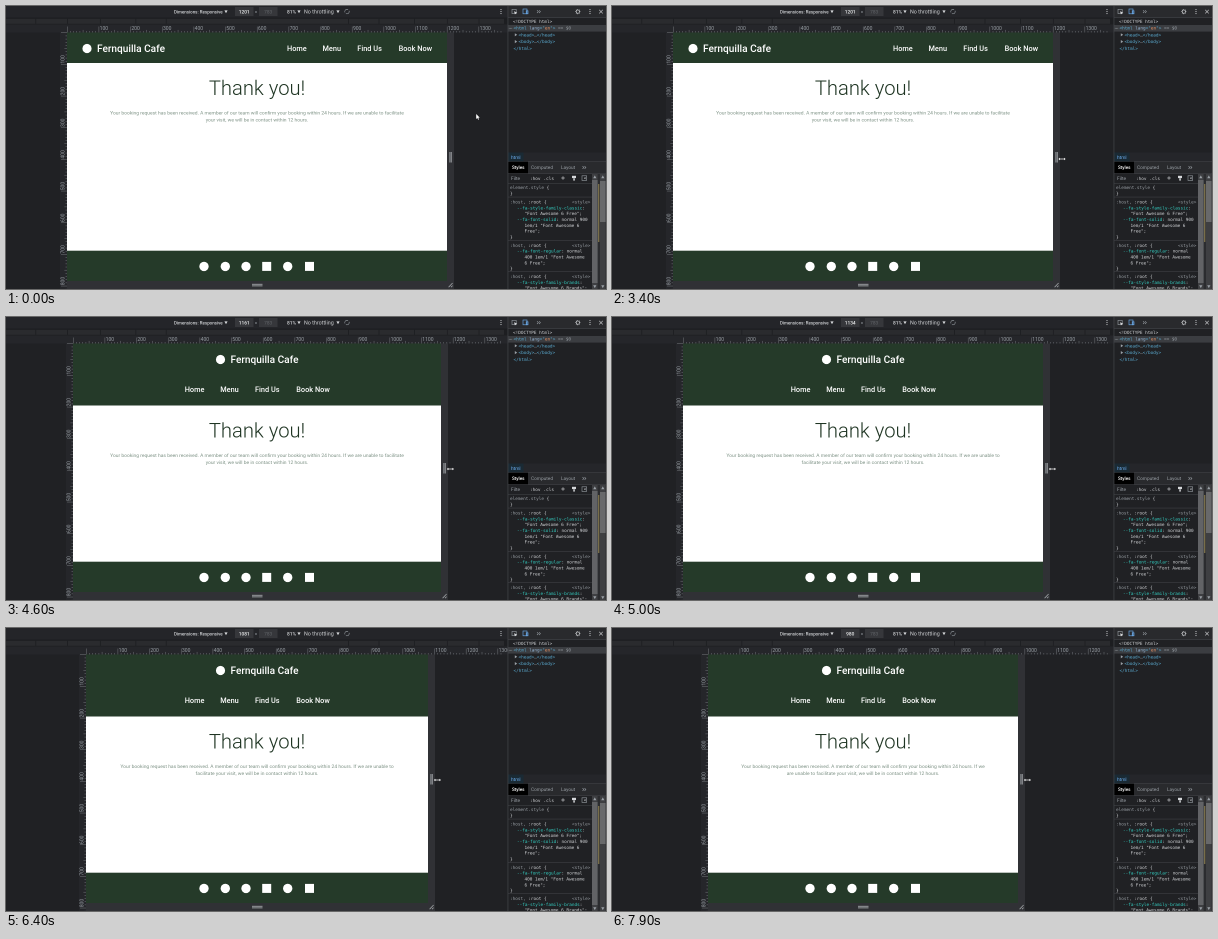
An HTML page with a canvas that plays this animation: 600x283 px, repeating every 8 s.

```html
<!DOCTYPE html>
<html lang="en">
<head>
<meta charset="utf-8">
<title>Responsive preview</title>
<style>
html, body { margin: 0; width: 100%; height: 100%; overflow: hidden; background: #202124; }
canvas { display: block; width: 600px; height: 283px; }
</style>
</head>
<body>
<canvas id="stage"></canvas>
<script>
const canvas = document.getElementById('stage');
const ctx = canvas.getContext('2d');
// Twice the screen density keeps the tiny text smooth.
const density = 2 * (window.devicePixelRatio || 1);
canvas.width = 600 * density;
canvas.height = 283 * density;

const LOOP = 8000, STEP = 100;
const MID = 251, TOP = 26.5, FOOT = 244.7, BOTTOM = 275, SCALE = 0.3166;
const SANS = 'Roboto, "Open Sans", sans-serif';
const MONO = '"DejaVu Sans Mono", "Liberation Mono", monospace';
const GREEN = '#253a29', INK = '#1f3523';
const BLUE = '#5db0d7', TEAL = '#35d4c7', PALE = '#d5d7da', GREY = '#9aa0a6';

// [ms, device width]
const widths = [[0, 1201], [3450, 1201], [3600, 1195], [4200, 1181.6], [4500, 1168],
  [5000, 1134.4], [5400, 1118], [5800, 1106.4], [6300, 1086], [7100, 1047.2],
  [7200, 1037], [7900, 980.4]];
const pointerX = [[0, 471], [900, 472], [1800, 466], [2700, 451], [3400, 450]];
const pointerY = [[0, 109], [900, 114], [1800, 131], [2700, 152], [3400, 153], [4200, 152]];

const message = ('Your booking request has been received. A member of our team will confirm ' +
  'your booking within 24 hours. If we are unable to facilitate your visit, ' +
  'we will be in contact within 12 hours.').split(' ');

function track(keys, t) {
  if (t <= keys[0][0]) return keys[0][1];
  for (let i = 1; i < keys.length; i++) {
    const [t0, v0] = keys[i - 1], [t1, v1] = keys[i];
    if (t <= t1) return v0 + (v1 - v0) * (t - t0) / (t1 - t0);
  }
  return keys[keys.length - 1][1];
}

function rect(x, y, w, h, color) {
  ctx.fillStyle = color;
  ctx.fillRect(x, y, w, h);
}

function disc(x, y, r, color) {
  ctx.fillStyle = color;
  ctx.beginPath();
  ctx.arc(x, y, r, 0, Math.PI * 2);
  ctx.fill();
}

function poly(points, color, close) {
  ctx.beginPath();
  points.forEach(([x, y], i) => i ? ctx.lineTo(x, y) : ctx.moveTo(x, y));
  if (close) {
    ctx.fillStyle = color;
    ctx.fill();
  } else {
    ctx.strokeStyle = color;
    ctx.stroke();
  }
}

function text(str, x, y, size, color, { weight = 400, align = 'left', font = SANS } = {}) {
  ctx.font = `${weight} ${size}px ${font}`;
  ctx.textAlign = align;
  ctx.fillStyle = color;
  ctx.fillText(str, x, y);
}

// Coloured runs of code: color, string, color, string ...
function code(x, y, ...runs) {
  for (let i = 0; i < runs.length; i += 2) {
    text(runs[i + 1], x, y, 4.35, runs[i], { font: MONO });
    x += ctx.measureText(runs[i + 1]).width;
  }
}

// Small triangle pointing down (dir 1) or up (dir -1).
function caret(x, y, color = PALE, dir = 1) {
  poly([[x - 1.6, y - 1.2 * dir], [x + 1.6, y - 1.2 * dir], [x, y + 1.6 * dir]], color, true);
}

function dots(x, y) {
  for (const d of [-2, 0, 2]) disc(x, y + d, 0.55, PALE);
}

function chevrons(x, y) {
  ctx.lineWidth = 0.6;
  for (const d of [0, 2]) poly([[x + d, y - 1.4], [x + d + 1.4, y], [x + d, y + 1.4]], GREY);
}

function deviceBar(width) {
  rect(0, 0, 502, 11.5, '#242529');
  text('Dimensions: Responsive', 168, 7.3, 4.45, PALE, { weight: 500 });
  caret(220, 5.6);
  rect(229, 1, 18.5, 9, '#36373b');
  text(Math.floor(width), 238.2, 7.4, 4.8, '#f1f3f4', { weight: 500, align: 'center' });
  text('×', 250, 7.4, 4.6, GREY, { align: 'center' });
  rect(253, 1, 18.5, 9, '#36373b');
  text('783', 262.2, 7.4, 4.8, '#64676b', { align: 'center' });
  text('81%', 281, 7.4, 4.9, PALE, { weight: 500 });
  caret(293, 5.6);
  text('No throttling', 298, 7.4, 5.35, PALE);
  caret(332, 5.6);
  ctx.lineWidth = 0.6;
  ctx.strokeStyle = GREY;
  for (const from of [-0.4, 2.75]) {
    ctx.beginPath();
    ctx.arc(341, 5.6, 2.2, from, from + 2.5);
    ctx.stroke();
  }
  dots(495, 5.6);

  rect(0, 11.5, 502, 7, '#1d1e21');
  rect(0, 12.8, 498, 5, '#2a2b2e');
  for (const bp of [576, 768, 992, 1200, 1400]) {
    for (const side of [-1, 1]) rect(MID + side * bp * SCALE / 2, 12.8, 0.8, 5, '#1d1e21');
  }
}

function rulers(left) {
  rect(0, 18.5, 502, 8, '#25262a');
  rect(left - 7, TOP, 7, 283 - TOP, '#25262a');
  const gap = 10 * SCALE;
  const size = n => n % 10 === 0 ? 6 : n % 5 === 0 ? 2.6 : 1.5;
  for (let n = 0; left + n * gap < 497; n++) {
    const x = left + n * gap;
    rect(x, TOP - size(n), 0.5, size(n), '#73767b');
    if (n && n % 10 === 0) text(n * 10, x + 1, 24, 5, GREY);
  }
  for (let n = 0; TOP + n * gap < 283; n++) {
    const y = TOP + n * gap;
    rect(left - size(n), y, size(n), 0.5, '#73767b');
    if (n && n % 10 === 0) {
      ctx.save();
      ctx.translate(left - 2.4, y - 0.5);
      ctx.rotate(-Math.PI / 2);
      text(n * 10, 0, 0, 5, GREY);
      ctx.restore();
    }
  }
}

function wrap(limit) {
  ctx.font = `400 4.95px ${SANS}`;
  const lines = [''];
  for (const word of message) {
    const last = lines[lines.length - 1];
    const next = last ? last + ' ' + word : word;
    if (ctx.measureText(next).width > limit) lines.push(word);
    else lines[lines.length - 1] = next;
  }
  return lines;
}

function page(left, right, width) {
  const wide = width >= 1200;
  const w = right - left;
  const headEnd = wide ? 57 : 88.5;
  rect(left, TOP, w, BOTTOM - TOP, '#ffffff');
  rect(left, TOP, w, headEnd - TOP, GREEN);

  const brandX = wide ? left + 20 : 214.5;
  disc(brandX, 42.5, 4.6, '#ffffff');
  text('Fernquilla Cafe', brandX + 10, 46, 10.1, '#ffffff', { weight: 500 });
  const navX = wide ? right - 160 : 178.7;
  const navY = wide ? 45.1 : 75.2;
  [['Home', 0], ['Menu', 35.5], ['Find Us', 70.3], ['Book Now', 111.6]]
    .forEach(([label, dx]) => text(label, navX + dx, navY, 7.35, '#ffffff', { weight: 500 }));

  text('Thank you!', MID, headEnd + 32, 20.2, INK, { weight: 300, align: 'center' });
  wrap(w * 0.8).forEach((line, i) =>
    text(line, MID, headEnd + 51.7 + i * 6.8, 4.95, '#7c9184', { align: 'center' }));

  rect(left, FOOT, w, BOTTOM - FOOT, GREEN);
  for (const x of [198, 219.3, 240, 281.7]) disc(x, 260.4, 4.7, '#ffffff');
  for (const x of [260.7, 303.5]) rect(x - 4.5, 255.9, 9, 9, '#ffffff');
}

function handles(left, right) {
  rect(right, TOP, 7, 283 - TOP, '#303135');
  rect(left, BOTTOM, right - left + 7, 8, '#303135');
  rect(right + 2.3, 146, 2.6, 10.5, '#8a8d91');
  rect(right + 3.4, 146, 0.5, 10.5, '#4a4c50');
  rect(MID - 5, 277.8, 10.5, 2.6, '#8a8d91');
  rect(MID - 5, 278.9, 10.5, 0.5, '#4a4c50');
  ctx.lineWidth = 0.8;
  poly([[right + 1.6, 281.2], [right + 5.6, 277]], '#a0a3a7');
  poly([[right + 4, 281.2], [right + 5.6, 279.6]], '#a0a3a7');
}

function sizeTip(right) {
  rect(right - 58, 27, 58, 9.3, '#c9cbcc');
  text('1181.60px × 783.20px', right - 29, 33.4, 5.2, '#4a4c4f', { align: 'center' });
}

function elementsPanel() {
  rect(502, 0, 98, 283, '#202124');
  rect(502, 0, 98, 11.5, '#292a2d');
  rect(502, 11.2, 98, 0.6, '#45474b');
  ctx.lineWidth = 0.6;
  ctx.strokeStyle = GREY;
  ctx.strokeRect(506, 3.4, 4.2, 4.2);
  poly([[508, 5.2], [511.2, 6.6], [508.9, 8.4]], PALE, true);
  ctx.strokeStyle = '#6fb2f5';
  ctx.strokeRect(517, 3, 4, 4.8);
  ctx.strokeRect(520.2, 4.8, 1.8, 3);
  chevrons(531, 5.6);
  ctx.strokeStyle = PALE;
  ctx.beginPath();
  ctx.arc(571.8, 5.6, 1.6, 0, 7);
  ctx.stroke();
  for (let a = 0; a < 8; a++) {
    const c = Math.cos(a * Math.PI / 4), s = Math.sin(a * Math.PI / 4);
    poly([[571.8 + c * 1.6, 5.6 + s * 1.6], [571.8 + c * 2.6, 5.6 + s * 2.6]], PALE);
  }
  dots(584, 5.6);
  poly([[593.2, 3.8], [596.8, 7.4]], PALE);
  poly([[596.8, 3.8], [593.2, 7.4]], PALE);

  rect(502, 19, 98, 6.6, '#3b3d41');
  code(507, 17.2, PALE, '<!DOCTYPE html>');
  for (const x of [503.2, 504.5, 505.8]) disc(x, 22.3, 0.4, GREY);
  code(507.5, 23.6, BLUE, '<html', '#9bbbdc', ' lang', BLUE, '="', '#f29766', 'en', BLUE, '">', GREY, ' == $0');
  for (const [tag, y] of [['head', 30.4], ['body', 37.2]]) {
    poly([[508.8, y - 3.2], [511.2, y - 1.6], [508.8, y]], GREY, true);
    code(512.5, y, BLUE, `<${tag}>`, GREY, '…', BLUE, `</${tag}>`);
  }
  code(507.5, 44, BLUE, '</html>');
}

function scrollbar(x, thumbY, thumbH, thumb) {
  rect(x, 168, 5.6, 115, '#3e3f42');
  rect(x, thumbY, 5.6, thumbH, thumb);
  caret(x + 2.8, 171, GREY, -1);
  caret(x + 2.8, 280.5, GREY);
}

function stylesPanel() {
  rect(502, 146.5, 98, 9, '#25262a');
  rect(502, 146.5, 15.5, 9, '#1a2a34');
  text('html', 505, 152.8, 4.8, '#6fb2f5');
  rect(502, 155.5, 98, 12, '#292a2d');
  rect(502, 155.2, 98, 0.5, '#45474b');
  rect(502, 155.7, 20, 11.7, '#000000');
  text('Styles', 506, 163.2, 4.6, '#ffffff', { weight: 500 });
  text('Computed', 525, 163.2, 4.75, GREY);
  text('Layout', 555, 163.2, 4.75, GREY);
  chevrons(576.5, 161.5);
  rect(502, 167.4, 98, 0.5, '#45474b');
  text('Filte', 505, 174, 4.8, GREY);
  code(524, 173.8, PALE, ':hov');
  code(537.5, 173.8, PALE, '.cls');
  ctx.lineWidth = 0.6;
  poly([[555.2, 172], [558.8, 172]], PALE);
  poly([[557, 170.2], [557, 173.8]], PALE);
  rect(566, 169.8, 4, 2.3, PALE);
  rect(567.3, 172.3, 1.5, 2.3, PALE);
  ctx.strokeStyle = GREY;
  ctx.strokeRect(576, 169.8, 4.6, 4.6);
  poly([[579.4, 171], [578, 172.1], [579.4, 173.2]], PALE, true);
  rect(502, 177, 84, 0.5, '#45474b');

  code(504, 182.8, GREY, 'element.style', PALE, ' {');
  code(504, 188.8, PALE, '}');
  const rule = (y, ...lines) => {
    rect(502, y - 6.6, 84, 0.5, '#45474b');
    code(504, y, GREY, ':host, ', PALE, ':root {');
    code(566, y, GREY, '<style>');
    lines.forEach(([name, value], i) => {
      const ly = y + 5.85 * (i + 1);
      if (name) code(511, ly, TEAL, name, PALE, ':' + value);
      else code(518.5, ly, PALE, value);
    });
    code(504, y + 5.85 * (lines.length + 1), PALE, '}');
  };
  rule(197.4, ['--fa-style-family-classic', ''], ['', '"Font Awesome 6 Free";'],
    ['--fa-font-solid', ' normal 900'], ['', '1em/1 "Font Awesome 6'], ['', 'Free";']);
  rule(240.8, ['--fa-font-regular', ' normal'], ['', '400 1em/1 "Font Awesome'], ['', '6 Free";']);
  rule(272, ['--fa-style-family-brands', ''], ['', '"Font Awesome 6 Brands";']);

  rect(586, 168, 14, 115, '#2b2c2f');
  scrollbar(586, 174, 103, '#626366');
  scrollbar(594, 175, 41, '#68696b');
  rect(592.2, 178, 1.1, 58, '#8c7f52');
  rect(501.6, 0, 0.7, 283, '#45474b');
}

function cursor(x, y) {
  if (x > 453) {
    const tip = [[0, 0], [0, 5], [1.2, 4], [2, 5.8], [2.8, 5.4], [2, 3.7], [3.5, 3.6]]
      .map(([dx, dy]) => [x - 0.8 + dx, y - 1 + dy]);
    poly(tip, '#ffffff', true);
    return;
  }
  ctx.lineWidth = 0.7;
  poly([[x - 2.4, y], [x + 2.4, y]], '#ffffff');
  for (const s of [-1, 1]) {
    poly([[x + s * 3.6, y], [x + s * 2, y - 1.3], [x + s * 2, y + 1.3]], '#ffffff', true);
  }
}

function draw(t) {
  const width = track(widths, t);
  const half = width * SCALE / 2;
  const left = Math.round(MID - half), right = Math.round(MID + half);
  const dragging = t >= 3450;
  ctx.setTransform(density, 0, 0, density, 0, 0);
  ctx.textBaseline = 'alphabetic';
  rect(0, 0, 600, 283, '#202124');
  deviceBar(width);
  rulers(left);
  handles(left, right);
  page(left, right, width);
  if (t >= 4000 && t < 4500) sizeTip(right);
  elementsPanel();
  stylesPanel();
  cursor(dragging ? right + 9.4 : track(pointerX, t), track(pointerY, t));
}

const start = performance.now();
function tick() {
  const t = (performance.now() - start) % LOOP;
  draw(Math.floor(t / STEP) * STEP);
  requestAnimationFrame(tick);
}
tick();
</script>
</body>
</html>
```
